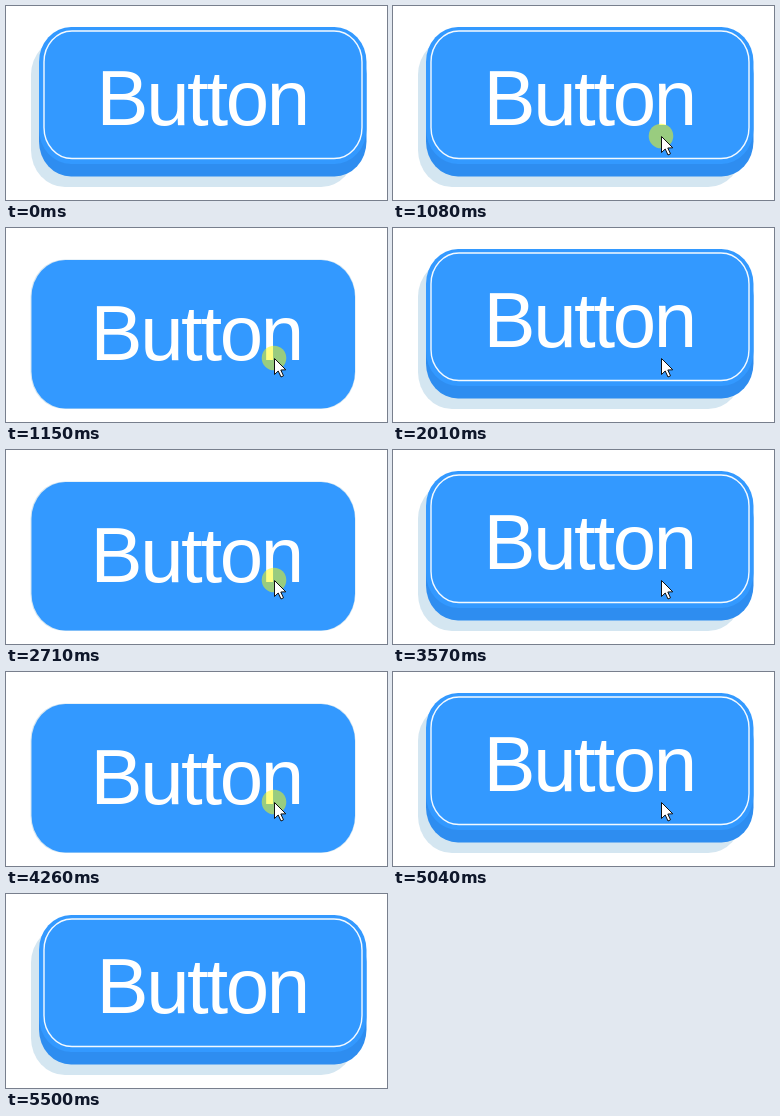
These frames come from a looping animation (381 px wide and 194 px high, 5960 ms). An HTML page with a canvas:

```html
<!DOCTYPE html>
<html lang="en">
<head>
<meta charset="utf-8">
<title>Button</title>
<style>
  html, body { margin: 0; width: 100%; height: 100%; overflow: hidden; background: #fff; }
  canvas { display: block; }
</style>
</head>
<body>
<canvas id="stage" width="381" height="194"></canvas>
<script>
const ctx = document.getElementById('stage').getContext('2d');
const LOOP = 5960;
const BLUE = '#3399ff';
const SHADOW = '#d4e6f1';

// The first click is marked shortly before the button sinks.
const CLICKS = [[1080, 2010], [2710, 3570], [4260, 5040]];
const PRESSES = [[1150, 2010], [2710, 3570], [4260, 5040]];

// Pointer stops: time and tip position; null means off stage.
const POINTER = [
  [0, null],
  [380, [286, 178]],
  [455, [273, 142]],
  [530, [268, 130]],
  [5340, [281, 144]],
  [5420, [314, 178]],
  [5500, null]
];

const within = (spans, t) => spans.some(([from, to]) => t >= from && t < to);

function panel(x, y, w, h, rx, ry, color) {
  ctx.beginPath();
  ctx.roundRect(x, y, w, h, { x: rx, y: ry });
  ctx.fillStyle = color;
  ctx.fill();
}

function label(x, baseline) {
  ctx.font = '78px "Liberation Sans", Arial, sans-serif';
  ctx.letterSpacing = '-2.4px';
  ctx.fillStyle = '#fff';
  ctx.fillText('Button', x, baseline);
}

function raisedButton() {
  panel(25, 32, 324, 149, 34, 37, SHADOW);
  panel(33, 33, 327.5, 137.5, 32, 35, '#2e8df0');
  panel(33, 21, 327.5, 137, 32, 35, BLUE);
  ctx.beginPath();
  ctx.roundRect(38, 25, 318, 127.5, { x: 28, y: 31 });
  ctx.strokeStyle = '#f4faff';
  ctx.lineWidth = 1.4;
  ctx.stroke();
  label(90.5, 118.5);
}

function pressedButton() {
  panel(24.5, 31.5, 325, 149.5, 34, 37, SHADOW);
  panel(25.5, 32, 323.5, 148.5, 34, 37, BLUE);
  label(84.5, 132);
}

function pointer(x, y) {
  const outline = [[0, 0], [0, 16], [3.7, 12.5], [6.5, 18.5], [9, 17.3], [6.3, 11.5], [11.3, 11.3]];
  ctx.beginPath();
  outline.forEach(([dx, dy]) => ctx.lineTo(x + 0.5 + dx, y + 0.5 + dy));
  ctx.closePath();
  ctx.fillStyle = '#fff';
  ctx.fill();
  ctx.strokeStyle = '#111';
  ctx.lineWidth = 1;
  ctx.lineJoin = 'round';
  ctx.stroke();
}

function clickMark(x, y) {
  ctx.beginPath();
  ctx.arc(x, y, 12.3, 0, Math.PI * 2);
  ctx.fillStyle = 'rgba(255, 255, 0, 0.5)';
  ctx.fill();
}

function draw(now) {
  const t = now % LOOP;
  const tip = POINTER.filter(([time]) => time <= t).pop()[1];

  ctx.fillStyle = '#fff';
  ctx.fillRect(0, 0, 381, 194);
  if (within(PRESSES, t)) pressedButton();
  else raisedButton();
  if (tip) {
    if (within(CLICKS, t)) clickMark(...tip);
    pointer(...tip);
  }
}

const start = performance.now();
function tick() {
  draw(performance.now() - start);
  requestAnimationFrame(tick);
}
tick();
</script>
</body>
</html>
```
